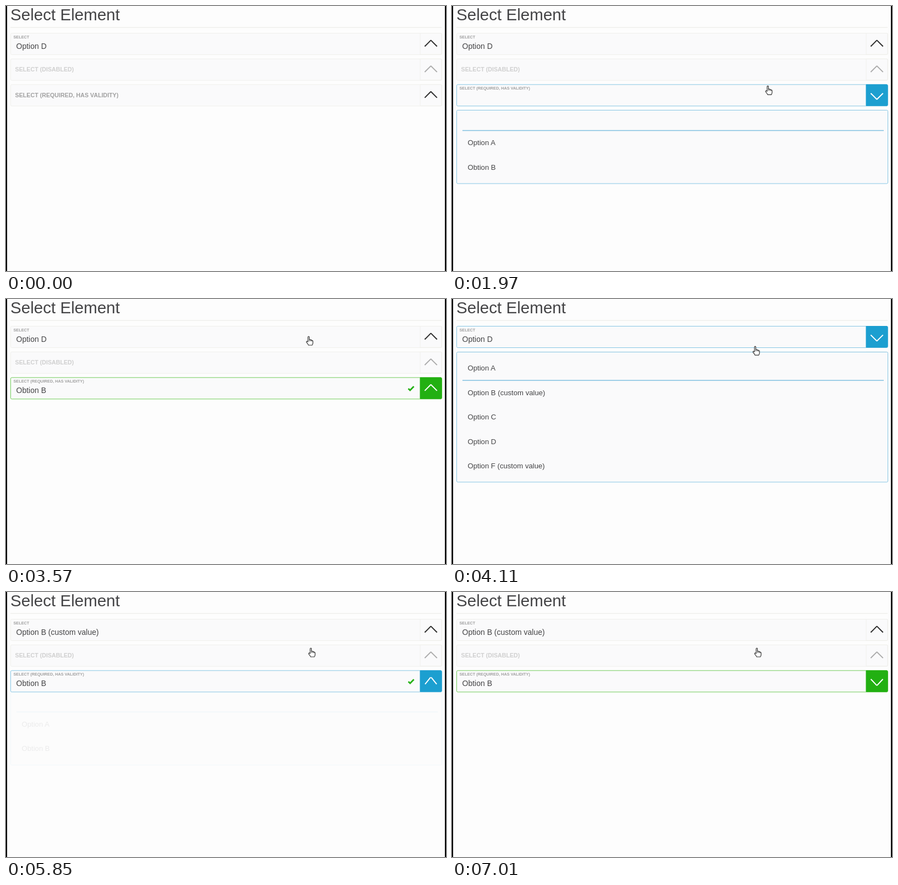
Recreate the animation shown at these times as an HTML page. Size 800 px wide and 482 px high, loop 7.05 s.

```html
<!DOCTYPE html>
<html lang="en">
<head>
<meta charset="utf-8">
<title>Select Element</title>
<style>
  html, body { margin: 0; width: 100%; height: 100%; overflow: hidden; background: #fdfdfd; }
  svg { display: block; width: 800px; height: 482px; font-family: "Liberation Sans", Arial, sans-serif; }
  .label { font-weight: bold; }
</style>
</head>
<body>
<svg id="stage" viewBox="0 0 800 482"></svg>
<script>
const LOOP = 7050;
const INK = '#444446', BLUE = '#1c9fd0', BLUE_EDGE = '#86c6e4', GREEN = '#22b012', GREEN_EDGE = '#70cb58';
const PAGE = '#fdfdfd', PANEL = '#fafafb', IDLE_EDGE = '#f0f0ec';
const stage = document.getElementById('stage');

function add(parent, tag, attrs = {}, text = '') {
  const node = document.createElementNS('http://www.w3.org/2000/svg', tag);
  set(node, attrs);
  node.textContent = text;
  parent.appendChild(node);
  return node;
}
function set(node, attrs) {
  for (const key in attrs) node.setAttribute(key, attrs[key]);
}
const mix = (a, b, p) => a + (b - a) * p;
function ramp(t, start, length) {
  const p = Math.min(1, Math.max(0, (t - start) / length));
  return p * p * (3 - 2 * p);
}
// Last value whose start time has passed.
function step(t, entries) {
  let value = entries[0][1];
  for (const [at, next] of entries) if (t >= at) value = next;
  return value;
}

add(stage, 'rect', { width: 800, height: 482, fill: PAGE });
add(stage, 'text', { x: 8, y: 26, 'font-size': 29.6, fill: INK }, 'Select Element');
add(stage, 'path', { d: 'M8 39H792', stroke: IDLE_EDGE, 'stroke-width': 1.5 });

function makeField(y, label, disabled) {
  const g = add(stage, 'g', { transform: `translate(0 ${y})` });
  const box = add(g, 'rect', { x: 8.5, y: .5, width: 784, height: 39, rx: 2, fill: PANEL });
  const button = add(g, 'path', { d: 'M753 .5H790Q792 .5 792 2.5V37Q792 39 790 39H753Z' });
  const caption = add(g, 'text', { class: 'label', fill: disabled ? '#cfcfcf' : '#a0a0a0' }, label);
  const value = add(g, 'text', { x: 18.5, y: 29, 'font-size': 14, fill: INK });
  const check = add(g, 'path', { d: 'M-5 .5L-1.8 3.6L5 -3.4', fill: 'none', stroke: GREEN, 'stroke-width': 2.8, opacity: 0 });
  const arms = [-1, 1].map(side => ({ side, line: add(g, 'path', { d: 'M0 -8V8', 'stroke-width': 2 }) }));
  return { disabled, box, button, caption, value, check, arms };
}

function drawField(f, { color = null, open = 0, value = '', floated = 1, check = 0 }) {
  set(f.box, { stroke: color === BLUE ? BLUE_EDGE : color === GREEN ? GREEN_EDGE : IDLE_EDGE });
  set(f.button, { fill: color || PANEL, stroke: color || IDLE_EDGE });
  set(f.caption, { x: mix(16.5, 13.5, floated), y: mix(23.7, 10, floated), 'font-size': mix(10.7, 7.3, floated) });
  if (f.value.textContent !== value) f.value.textContent = value;
  set(f.check, { opacity: check, transform: `translate(${mix(742, 736.5, check)} 20)` });
  const angle = mix(45, -45, open), shift = mix(18.8, 22, open);
  for (const { side, line } of f.arms) {
    set(line, {
      transform: `translate(${772.5 + side * 5.5} ${shift}) rotate(${-side * angle})`,
      stroke: color ? '#fff' : f.disabled ? '#ababab' : '#2c2c2c'
    });
  }
}

function makeList(top, bottom, firstLine, options) {
  const g = add(stage, 'g');
  add(g, 'rect', { x: 8.5, y: top + .5, width: 784, height: bottom - top, rx: 2, fill: PANEL, stroke: BLUE_EDGE });
  options.forEach((text, i) =>
    add(g, 'text', { x: 28.5, y: firstLine - 18 + i * 44.6, 'font-size': 13.15, fill: INK }, text));
  const line = add(g, 'path', { d: 'M19 0H785', stroke: '#7fbfe0', 'stroke-width': 1.5 });
  return { g, line, firstLine };
}

function drawList(list, shown, item) {
  set(list.g, { opacity: shown, transform: `translate(0 ${-9 * (1 - shown)})`, visibility: shown ? 'visible' : 'hidden' });
  set(list.line, { transform: `translate(0 ${list.firstLine + item * 44.6})` });
}

const first = makeField(49, 'SELECT');
const disabled = makeField(95.7, 'SELECT (DISABLED)', true);
const required = makeField(142.4, 'SELECT (REQUIRED, HAS VALIDITY)');
const firstList = makeList(96, 332.5, 148, ['Option A', 'Option B (custom value)', 'Option C', 'Option D', 'Option F (custom value)']);
const requiredList = makeList(189, 322.5, 226.5, ['', 'Option A', 'Obtion B']);

add(stage, 'path', { d: 'M1 0V482M799 0V482', stroke: '#000', 'stroke-width': 2 });

const hand = add(stage, 'g', { fill: '#fff', stroke: '#333', 'stroke-width': 1.2, 'stroke-linejoin': 'round' });
add(hand, 'path', { d: 'M-3 2V-6.5Q-3 -8 -1.8 -8T-.6 -6.5V-2Q1 -3.2 1.8 -1.4Q3.3 -2.2 4 -.6Q6 -1 6 1.4V4Q6 6 4.6 8H-2Q-3.4 5 -5.6 2.8Q-6.2 1 -4.6 .9Q-3.6 1 -3 2Z' });
add(hand, 'path', { d: 'M-.6 -2V1M1.8 -1.4V1M4 -.6V1.4', fill: 'none', 'stroke-width': .9 });

const path = [
  [1020, 652, 495], [1120, 630, 340], [1165, 625, 283], [1210, 603, 210], [1300, 589, 118],
  [1450, 580, 125], [1600, 576, 153], [1970, 576, 153], [2420, 560, 293], [2600, 560, 290],
  [2770, 554, 211], [3000, 552, 150], [3300, 552, 76], [3850, 552, 76], [4110, 553, 94],
  [4500, 556, 172], [4800, 556, 172], [5200, 556, 110], [LOOP, 556, 110]
];
function drawHand(t) {
  const i = path.findIndex(p => p[0] > t);
  set(hand, { visibility: i > 0 ? 'visible' : 'hidden' });
  if (i < 1) return;
  const [t0, x0, y0] = path[i - 1], [t1, x1, y1] = path[i];
  const p = (t - t0) / (t1 - t0);
  set(hand, { transform: `translate(${mix(x0, x1, p)} ${mix(y0, y1, p)})` });
}

const FIRST_OPEN = [[3740, 4740]];
const REQUIRED_OPEN = [[1640, 2570], [5805, 6980]];
const during = (t, spans, inTime, outTime) =>
  spans.reduce((sum, [a, b]) => sum + ramp(t, a, inTime) - ramp(t, b, outTime), 0);

function render(t) {
  drawField(first, {
    color: step(t, [[0, null], [3740, BLUE], [5300, null]]),
    open: during(t, FIRST_OPEN, 300, 350),
    value: t < 4740 ? 'Option D' : 'Option B (custom value)'
  });
  drawField(disabled, { floated: 0 });
  drawField(required, {
    color: step(t, [[0, null], [1640, BLUE], [2570, GREEN], [3740, null], [5300, GREEN], [5805, BLUE], [6980, GREEN]]),
    open: during(t, REQUIRED_OPEN, 300, 350),
    value: t < 2570 ? '' : 'Obtion B',
    floated: ramp(t, 1180, 115),
    check: ramp(t, 2610, 300) - ramp(t, 5830, 250)
  });
  drawList(firstList, during(t, FIRST_OPEN, 250, 25), step(t, [[0, 0], [4380, 1]]));
  drawList(requiredList, during(t, REQUIRED_OPEN, 250, 25),
    step(t, [[0, 0], [2210, 1], [2350, 2], [5000, 0], [6250, 1], [6600, 2]]));
  drawHand(t);
}

const began = performance.now();
function tick() {
  render((performance.now() - began) % LOOP);
  requestAnimationFrame(tick);
}
tick();
</script>
</body>
</html>
```
